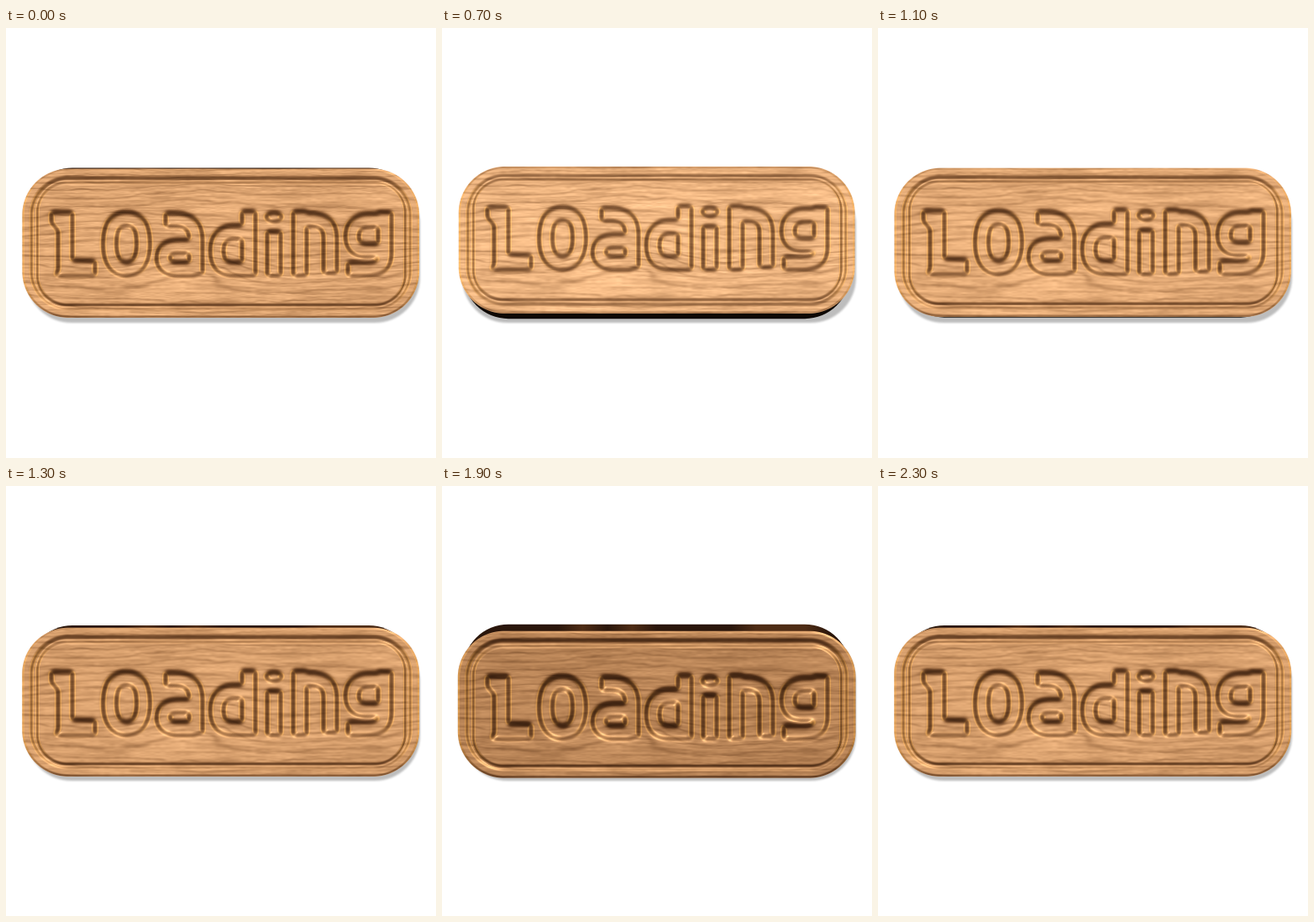
Recreate the animation shown at these times as an HTML page with a canvas. Size 512 by 512 pixels, loop 2400 ms.

```html
<!DOCTYPE html>
<html lang="en">
<head>
<meta charset="utf-8">
<title>Loading</title>
<style>
  html, body { margin: 0; width: 100%; height: 100%; overflow: hidden; background: #fff; }
  canvas { display: block; width: 512px; height: 512px; }
</style>
</head>
<body>
<canvas id="stage" width="512" height="512" role="img" aria-label="Loading"></canvas>
<script>
const SIZE = 512, TOP = 150, ROWS = 220, MIDDLE = 257;
const LOOP = 2400, STEP = 100;
const stage = document.getElementById('stage').getContext('2d');

function makeCanvas(width, height) {
  const canvas = document.createElement('canvas');
  canvas.width = width;
  canvas.height = height;
  return canvas;
}
const clamp = v => Math.min(1, Math.max(0, v));
const smooth = (a, b, v) => { const t = clamp((v - a) / (b - a)); return t * t * (3 - 2 * t); };
const mix = (a, b, t) => a + (b - a) * t;

// Value noise
function hash(x, y) {
  let n = Math.imul(x, 374761393) + Math.imul(y, 668265263) | 0;
  n = Math.imul(n ^ n >>> 13, 1274126177);
  return ((n ^ n >>> 16) >>> 0) / 4294967295;
}
function noise(x, y) {
  const ix = Math.floor(x), iy = Math.floor(y);
  const u = smooth(0, 1, x - ix), v = smooth(0, 1, y - iy);
  return mix(mix(hash(ix, iy), hash(ix + 1, iy), u),
             mix(hash(ix, iy + 1), hash(ix + 1, iy + 1), u), v);
}

// Distance to a rounded rectangle, negative inside
function roundRect(x, y, halfW, halfH, r) {
  const qx = Math.abs(x) - halfW + r, qy = Math.abs(y) - halfH + r;
  return Math.hypot(Math.max(qx, 0), Math.max(qy, 0)) + Math.min(Math.max(qx, qy), 0) - r;
}

function buildLetters() {
  const ctx = makeCanvas(SIZE, ROWS).getContext('2d');
  ctx.translate(0, -TOP);
  ctx.filter = 'blur(2.4px)';
  ctx.lineWidth = 16;
  ctx.fill(new Path2D('M54 219H79V277H106V295H59L62 288V241L54 232Z'));
  ctx.fill(new Path2D('M309.5 225a9.5 5.5 0 1 0 19 0a9.5 5.5 0 1 0 -19 0Z'));
  ctx.stroke(new Path2D([
    'M143.5 227C160 227 163.5 240 163.5 257S158 287 143.5 287 123.5 275 123.5 257 128 227 143.5 227Z',
    'M190 228H200C219 228 226 236 226 252V293M226 260H205C190 260 187 267 187 274C187 283 194 287 203 287H226',
    'M289 218V295M289 243H270C256 243 251 253 251 265C251 281 258 287 271 287H289',
    'M319 242V295',
    'M350 218V295M350 228H362C380 228 386 236 386 250V292',
    'M451 219V269C451 282 445 287 430 287H407M451 229H432C418 229 412 237 412 248C412 260 418 265 430 265H451'
  ].join('')));
  const data = ctx.getImageData(0, 0, SIZE, ROWS).data;
  return Float32Array.from({ length: SIZE * ROWS }, (_, i) => data[i * 4 + 3] / 255);
}

function buildWood() {
  return Float32Array.from({ length: SIZE * ROWS }, (_, i) => {
    const x = i % SIZE, y = Math.floor(i / SIZE);
    const warp = noise(x / 110, y / 45);
    const ring = Math.sin(y * 0.6 + warp * 19 + noise(x / 18, y / 7) * 2) * 0.5 + 0.5;
    const streak = noise(x / 26, y / 1.7 + warp * 7) - 0.5;
    const pore = noise(x / 6, y / 1.05 + 40) - 0.5;
    const patch = noise(x / 45 + 9, y / 28) - 0.5;
    return 1.03 + streak * 0.17 + pore * 0.09 + patch * 0.07 - Math.pow(ring, 7) * 0.13;
  });
}

const letters = buildLetters();
const wood = buildWood();

function sample(map, x, y) {
  const row = Math.min(ROWS - 2, Math.max(0, y));
  const iy = Math.floor(row), i = iy * SIZE + x;
  return mix(map[i], map[i + SIZE], row - iy);
}

function renderFace(tilt) {
  const canvas = makeCanvas(SIZE, ROWS), ctx = canvas.getContext('2d');
  const image = ctx.createImageData(SIZE, ROWS), out = image.data;
  const height = new Float32Array(SIZE * ROWS), cover = new Float32Array(SIZE * ROWS);
  const squash = tilt * tilt;
  const restRow = (y, shift) => MIDDLE - TOP + (y + TOP - MIDDLE + shift * tilt) * (1 + 0.015 * squash);

  for (let y = 0, i = 0; y < ROWS; y++) {
    const py = y + TOP + 0.5, letterRow = restRow(y, 6.9);
    for (let x = 0; x < SIZE; x++, i++) {
      const inset = -roundRect(x - 255.2, py - 256.3 + 4 * tilt, 236.4 - 0.5 * tilt, 88.7 - 1.3 * squash, 55);
      const panel = -roundRect(x - 255.8, py - 257 + 5.4 * tilt, 220.5, 74.5 - 1.4 * squash, 37);
      cover[i] = clamp(inset + 0.5);
      height[i] = 1.5 * smooth(-0.5, 3, inset) - 3.8 * smooth(7.5, 14.5, inset)
        + 3.6 * smooth(-1.5, 4.5, panel) - 7.2 * sample(letters, x, letterRow);
    }
  }

  // Light from above, its angle follows the tilt
  const angle = (28 - 26 * tilt) * Math.PI / 180;
  const lightY = -Math.sin(angle), lightZ = Math.cos(angle);
  const gloss = 0.12 + 0.16 * (1 - tilt);
  const sheen = Math.exp(-(((tilt - 0.68) / 0.22) ** 2));

  for (let y = 1; y < ROWS - 1; y++) {
    const woodRow = restRow(y, 5.8);
    for (let x = 1; x < SIZE - 1; x++) {
      const i = y * SIZE + x;
      if (!cover[i]) continue;
      const dx = (height[i + 1] - height[i - 1]) / 2;
      const dy = (height[i + SIZE] - height[i - SIZE]) / 2;
      const nz = 1 / Math.hypot(dx, dy, 1), nx = -dx * nz, ny = -dy * nz;
      const lambert = Math.max(0, -0.1 * nx + lightY * ny + lightZ * nz);
      const shade = (0.45 + 0.57 * lambert) * (1 - 1.15 * (1 - nz)) * sample(wood, x, woodRow);
      const gold = 0.32 * Math.exp(-((Math.abs(nx) - 0.46) ** 2 / 0.025 + ny * ny / 0.2));
      const shine = gloss * Math.exp(-((nx - 0.22) ** 2 * 1.2 + (ny + 0.5) ** 2) / 0.05);
      const o = i * 4;
      out[o] = 228 * shade + 180 * gold + 235 * shine + 8 * sheen;
      out[o + 1] = 171 * shade ** 1.22 + 138 * gold + 195 * shine + 13 * sheen;
      out[o + 2] = 119 * shade ** 1.5 + 45 * gold + 135 * shine + 17 * sheen;
      out[o + 3] = 255 * cover[i];
    }
  }
  ctx.putImageData(image, 0, 0);
  return canvas;
}

function sideFill(ctx, tilt) {
  if (tilt > 0) return '#0e0804';
  const fill = ctx.createLinearGradient(20, 0, 492, 0);
  for (let k = 0; k <= 16; k++) {
    fill.addColorStop(k / 16, hash(k, 5) > 0.45 ? '#4e2c15' : '#2a160b');
  }
  return fill;
}

function renderScene(tilt) {
  const canvas = makeCanvas(SIZE, SIZE), ctx = canvas.getContext('2d');
  const slab = (fill, x, y, width, height) => {
    ctx.fillStyle = fill;
    ctx.beginPath();
    ctx.roundRect(x, y, width, height, 54);
    ctx.fill();
  };
  ctx.fillStyle = '#fff';
  ctx.fillRect(0, 0, SIZE, SIZE);
  ctx.filter = 'blur(1px)';
  slab('rgba(0,0,0,0.26)', 24, 180, 469, 171);
  ctx.filter = 'none';
  slab(sideFill(ctx, tilt), 25, 166.6 + 2 * tilt, 461, 177.6);
  ctx.drawImage(renderFace(tilt), 0, TOP);
  return canvas;
}

const scenes = [];
function draw(time) {
  const step = Math.floor((time % LOOP) / STEP);
  scenes[step] ||= renderScene(Math.sin(step * STEP / LOOP * 2 * Math.PI));
  stage.drawImage(scenes[step], 0, 0);
}

const start = performance.now();
function tick() {
  draw(performance.now() - start);
  requestAnimationFrame(tick);
}
tick();
</script>
</body>
</html>
```
